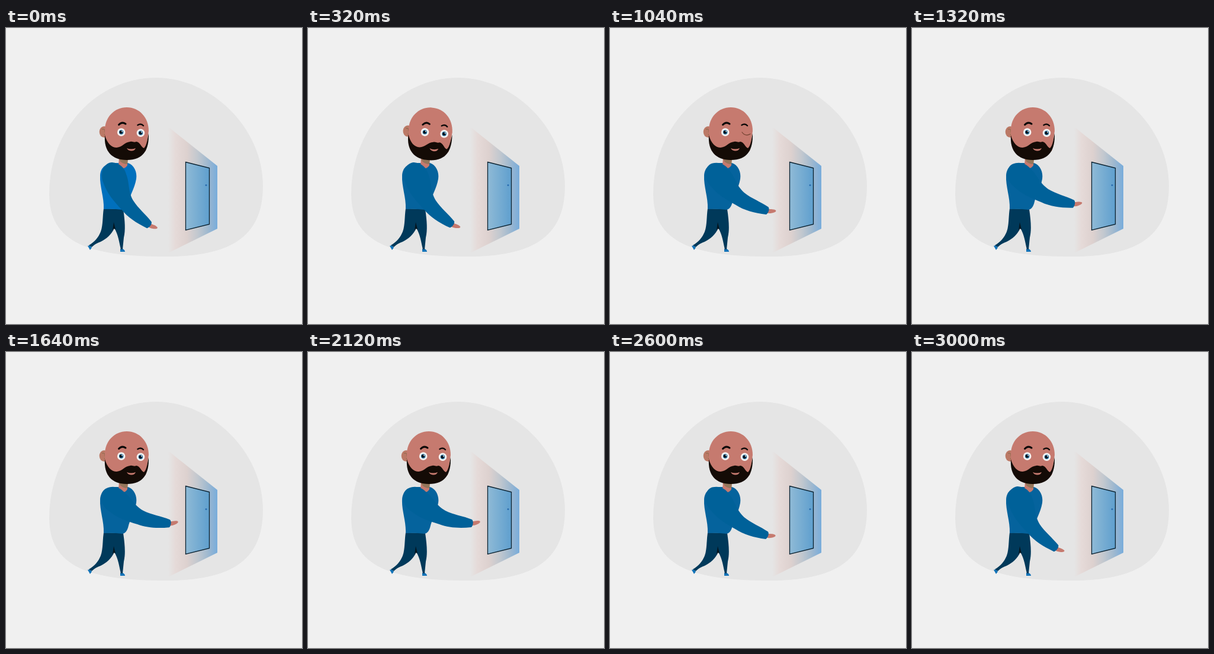
Recreate the animation shown at these times as an HTML page. Size 500 by 500 pixels, loop 3.04 s.

```html
<!DOCTYPE html>
<html lang="en">
<head>
<meta charset="utf-8">
<title>Man at a door</title>
<style>
  html, body { margin: 0; width: 100%; height: 100%; overflow: hidden; background: #f0f0f0; }
  svg { display: block; width: 100vw; height: 100vh; }
</style>
</head>
<body>
<svg viewBox="0 0 500 500">
  <defs>
    <linearGradient id="wallFill" gradientUnits="userSpaceOnUse" x1="274" x2="357" y1="0" y2="0">
      <stop offset="0" stop-color="#e5e5e5"/>
      <stop offset=".15" stop-color="#e5dad8"/>
      <stop offset=".38" stop-color="#ddd1cf"/>
      <stop offset=".6" stop-color="#c2c8cf"/>
      <stop offset=".8" stop-color="#a0b9cf"/>
      <stop offset="1" stop-color="#78acdb"/>
    </linearGradient>
    <linearGradient id="doorFill">
      <stop offset="0" stop-color="#8fbad6"/>
      <stop offset="1" stop-color="#5f9fce"/>
    </linearGradient>
    <g id="eye">
      <circle r="6.800" fill="#f3f3f3"/>
      <circle r="3.700" fill="#1b628f"/>
      <circle cx="-.5" r="2.400" fill="#081018"/>
      <circle cx="1.500" cy="-1.500" r="1" fill="#fff"/>
    </g>
  </defs>

  <path fill="#e5e5e5" d="M254 84C346 84 434 168 434 267C434 355 376 386 270 386C142 386 73 364 73 280C73 172 152 84 254 84Z"/>

  <path fill="url(#wallFill)" d="M274 167L357 233V339L274 380Z"/>
  <path fill="url(#doorFill)" stroke="#08202f" stroke-width="1.300" d="M303.500 226.500L343.500 236.500V331.500L303.500 341.500Z"/>
  <circle cx="338" cy="265.500" r="1.500" fill="#2a6db0"/>

  <!-- legs -->
  <path fill="#1273b8" d="M138 368L142 367L145 371L142 375Z M193 373H197Q201 375 201 378H193Z"/>
  <path fill="#00395a" d="M165 305L198 306C201 326 202 342 199 354L197 374H194C191 362 190 350 183 338C178 349 170 356 160 361Q151 364 145 370L140 367C150 361 156 354 160 344C164 333 163 318 165 305Z"/>
  <path fill="#04151f" d="M182 328L185 340L182 339L180 342Z"/>

  <!-- torso and neck -->
  <path id="torso" d="M165 306C166 286 158 268 159 249C160 233 172 227 187 228H206C216 231 222 243 220 255C217 272 210 280 206 297Q203 306 197 307Q180 305 165 306Z"/>
  <path fill="#c67a6f" d="M191 218H206L205 232Q202 237 197 237Q191 236 190 233Z"/>
  <path fill="#95765b" d="M192 221H206L205 230Q197 230 192 224Z"/>

  <g id="arm">
    <path fill="#c67a6f" d="M274 286C281 287 284 284 290 285.500C292.500 287 289 290 285 291.500Q280 294 274 293Z"/>
    <path fill="#006199" d="M199 236C212 246 215 258 232 268C246 275 262 277 277 283C280 286 279 293 276 296C256 298 238 297 222 291C203 285 189 281 173 268C158 257 157 238 168 231C180 225 191 228 199 236Z"/>
  </g>

  <g id="head">
    <ellipse cx="165.700" cy="175.500" rx="8" ry="9.500" fill="#bb7966"/>
    <path fill="none" stroke="#87684a" d="M162 171Q168 170 167 175Q169 178 166 181"/>
    <path fill="#c67a6f" d="M167 185V172C167 151 183 134 204 134S241 151 241 174L236 208H172Z"/>
    <path fill="#140b06" d="M167 181C171 195 178 202 187 202C197 201 200 193 210 192C214 191 216 194 220 192C226 192 228 201 233 203C238 199 239 186 241 178C242 206 232 223 204 223C179 223 165 208 167 181Z"/>
    <path fill="#c67a6f" d="M204 203Q211 206 219 203Q217 208 211 207.500Q206 207 204 203Z"/>
    <g fill="none" stroke="#0c0908" stroke-linecap="round">
      <path stroke-width="3" d="M190.500 163.500Q196 157.500 202 162"/>
      <path stroke-width="2.400" d="M222.500 164Q228 160.500 232 165"/>
    </g>
    <use href="#eye" x="194.700" y="176"/>
    <use id="openEye" href="#eye" x="227.500" y="177.300"/>
    <path id="wink" fill="none" stroke="#70402f" stroke-width="1.200" stroke-linecap="round" d="M223 176Q229 184 237 179"/>
  </g>
</svg>

<script>
const LOOP = 3040, STEP = 40, REST = 160;
const SWING = 31, TILT = 8;
const $ = id => document.getElementById(id);

function ease(t, from, to) {
  const u = Math.min(1, Math.max(0, (t - from) / (to - from)));
  return u * u * (3 - 2 * u);
}

// Rises from 0 to 1 between a and b, falls back between c and d.
const pulse = (t, a, b, c, d) => ease(t, a, b) - ease(t, c, d);

const rotate = (id, angle, x, y) =>
  $(id).setAttribute('transform', `rotate(${angle} ${x} ${y})`);

function draw(now) {
  const t = Math.floor(now % LOOP / STEP) * STEP;
  const winking = t >= 440 && t < 1200;

  rotate('arm', SWING * (1 - pulse(t, REST, 1700, 2200, 3100)), 181, 249);
  rotate('head', TILT * pulse(t, REST, 560, 640, 1000), 198, 231);
  $('openEye').style.display = winking ? 'none' : '';
  $('wink').style.display = winking ? '' : 'none';
  $('torso').setAttribute('fill', t < REST ? '#0070bd' : '#05639d');
  requestAnimationFrame(draw);
}
draw(performance.now());
</script>
</body>
</html>
```
